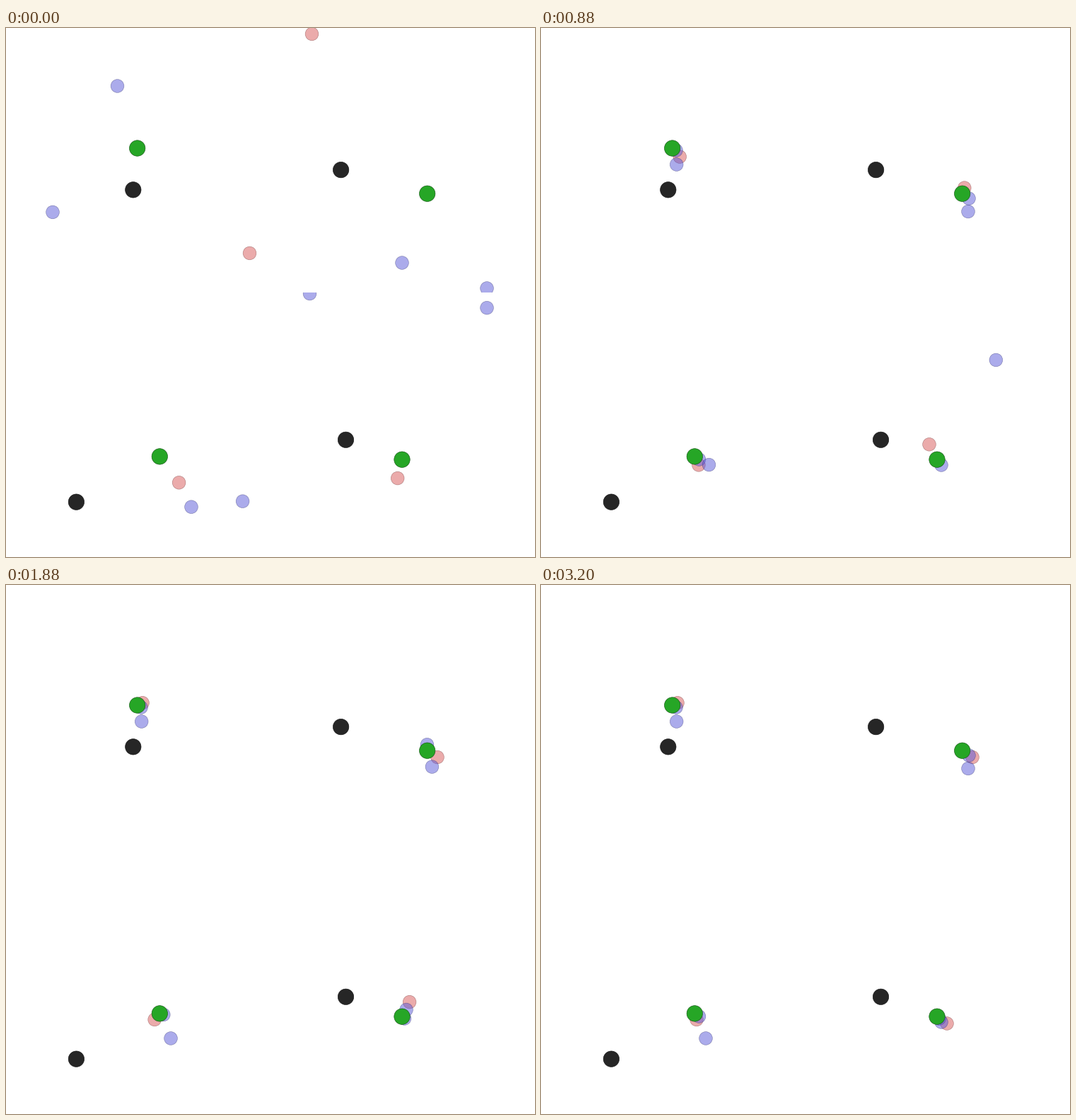
A matplotlib script that plays this animation: 748x748 px, repeating every 3240 ms.

```python
import numpy as np
import matplotlib.pyplot as plt
from matplotlib.animation import FuncAnimation
from matplotlib.patches import Circle

SIZE, DPI, HALF = 748, 100, 374
FRAMES, INTERVAL = 81, 40
SWAY_IN, SETTLED, SWAY_SPAN = 14, 22, 58
DAMPING = 0.75

RED, BLUE = (.85, .35, .35), (.35, .35, .85)
GREEN, DARK = (.15, .65, .15), (.15, .15, .15)


def travel(step):
    """Distance covered at unit top speed by a damped body starting at rest."""
    return step - (1 - DAMPING ** step) * DAMPING / (1 - DAMPING)


def glide(t, p, at):
    """Monotone cubic curve through (t, p) that comes to rest at the end."""
    h, d = np.diff(t), np.diff(p) / np.diff(t)
    m = np.zeros(len(p))
    for i in range(1, len(p) - 1):
        if d[i - 1] * d[i] > 0:
            w1, w2 = 2 * h[i] + h[i - 1], h[i] + 2 * h[i - 1]
            m[i] = (w1 + w2) / (w1 / d[i - 1] + w2 / d[i])
    m[0] = 1.5 * d[0] - .5 * m[1]
    at = np.minimum(at, t[-1])
    i = np.clip(np.searchsorted(t, at, side="right") - 1, 0, len(h) - 1)
    u = (at - t[i]) / h[i]
    return ((1 + 2 * u) * (1 - u) ** 2 * p[i] + u * (1 - u) ** 2 * h[i] * m[i]
            + u ** 2 * (3 - 2 * u) * p[i + 1] + u ** 2 * (u - 1) * h[i] * m[i + 1])


def route(start, *stops, sway=(0, 0), cycles=1, wave=np.cos):
    """Run from start past (step, x, y) stops, then sway about the last one."""
    k = np.arange(FRAMES, dtype=float)
    keys = np.array([(0, *start), *stops], float)
    t = travel(keys[:, 0])
    xy = np.column_stack([glide(t, c, travel(k)) for c in keys[:, 1:].T])
    fade = np.clip((k - SWAY_IN) / (SETTLED - SWAY_IN), 0, 1)
    swing = fade * wave(2 * np.pi * cycles * (k - SETTLED) / SWAY_SPAN)
    return xy + np.outer(swing, sway)


def disc(ax, xy, radius, color, alpha=1):
    edge = tuple(c / 2 for c in color)
    return ax.add_patch(Circle(xy, radius, fc=(*color, alpha),
                               ec=(*edge, alpha), lw=.6 * 72 / DPI))


fig = plt.figure(figsize=(SIZE / DPI, SIZE / DPI), dpi=DPI, facecolor="white")
agents = []


def world(col, row, green, dark, red, *blues):
    """One square arena; its axes clip whatever crosses the border."""
    ax = fig.add_axes([col / 2, (1 - row) / 2, .5, .5])
    ax.set_xlim(col * HALF, (col + 1) * HALF)
    ax.set_ylim((row + 1) * HALF, row * HALF)
    ax.axis("off")
    for color, path in [(RED, red)] + [(BLUE, b) for b in blues]:
        agents.append((disc(ax, path[0], 9.35, color, .5), path))
    disc(ax, green, 11.2, GREEN)
    disc(ax, dark, 11.2, DARK)


world(0, 0, (185.7, 170), (179.8, 228.8),
      route((344.5, 318.4), (14, 205.7, 216.4), (30, 193, 166.7)),
      route((157.5, 82), (20, 191, 173)),
      route((66, 260.4), (16, 191.7, 193)))

world(1, 0, (595.7, 234.2), (473.6, 200.6),
      route((432.5, 8.4), (14, 570.5, 183.7), (30, 610, 243.5)),
      route((560, 332), (14, 600, 233), sway=(5, 8)),
      route((680, 368), (16, 599.5, 252.5), sway=(4.5, 7), cycles=2))

world(0, 1, (217.3, 605.9), (99.4, 670.2),
      route((244.6, 642.8), (30, 220, 614.5),
            sway=(10, 0), cycles=4, wave=np.sin),
      route((262, 677.2), (16, 221.5, 603), sway=(2, 7), cycles=2),
      route((334.6, 669.2), (14, 305.5, 644.8), (22, 237.5, 617.6),
            (38, 213.6, 621.4), (47, 233, 641)))

world(1, 1, (560, 610.2), (480.5, 582.3),
      route((553.7, 636.6), (14, 522.7, 556), (22, 549, 588.8),
            (38, 567, 579), (65, 574, 620)),
      route((429.5, 375.6), (14, 531.8, 523.8), (22, 566, 618),
            sway=(-6, -12), wave=np.sin),
      route((680, 395.7), (14, 668.3, 433), (38, 580.4, 552), (52, 563, 613)))


def draw(frame):
    for patch, path in agents:
        patch.center = path[frame]
    return [patch for patch, _ in agents]


anim = FuncAnimation(fig, draw, frames=FRAMES, interval=INTERVAL,
                     repeat=True, repeat_delay=0)
plt.show()
```
